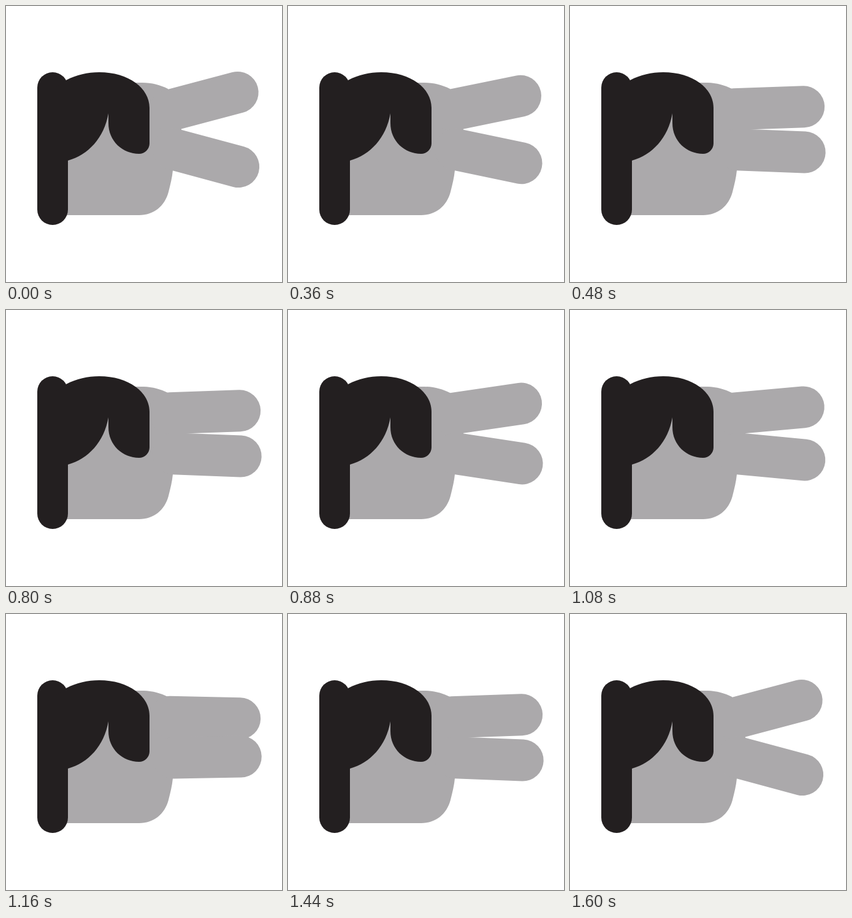
These frames come from a looping animation (450 px wide and 450 px high, 1920 ms). An HTML page:

```html
<!DOCTYPE html>
<html lang="en">
<head>
<meta charset="utf-8">
<title>Hand</title>
<style>
  html, body { margin: 0; width: 100%; height: 100%; overflow: hidden; background: #fff; }
  svg { display: block; width: 100vw; height: 100vh; }
</style>
</head>
<body>
<svg viewBox="0 0 450 450">
  <g fill="#aba9ab" stroke="#aba9ab" stroke-width="0">
    <path d="M80 125H222C238 125 252 129 264 135L280 170L286 200.8L276 240L272 268
             C271 279 268 291 265 303C259 326 241 341 217 341H80Z"/>
    <g stroke-width="68" stroke-linecap="round">
      <path id="upper" d="M-8 0H106"/>
      <path id="lower" d="M-4 0H106"/>
    </g>
  </g>
  <g fill="#231f20">
    <rect x="51" y="108" width="50" height="249" rx="25"/>
    <path d="M80 133L98 121C115 112 133 108 152 108C200 108 234 134 234 166V224
             A17 17 0 0 1 217 241C190 241 167 220 167 191V175C160 215 134 243 101 252H80Z"/>
  </g>
</svg>
<script>
const LOOP = 1920, TICK = 40, STEPS = 5;
const upper = document.getElementById("upper");
const lower = document.getElementById("lower");

// Number of steps taken by a move that begins at the given time
function taken(t, start) {
  const n = Math.floor((t - start) / TICK) + 1;
  return Math.max(0, Math.min(STEPS, n));
}

function place(finger, x, y, angle) {
  finger.setAttribute("transform", `translate(${x} ${y}) rotate(${angle})`);
}

function draw(t) {
  const closed = taken(t, 360) - taken(t, 800) + taken(t, 1000) - taken(t, 1440);
  place(upper, 275.2, 168, -(14.8 - 3.2 * closed));
  place(lower, 276.8, 234.5, 15.1 - 3.23 * closed);
}

const begin = performance.now();
function frame() {
  draw((performance.now() - begin) % LOOP);
  requestAnimationFrame(frame);
}
frame();
</script>
</body>
</html>
```
